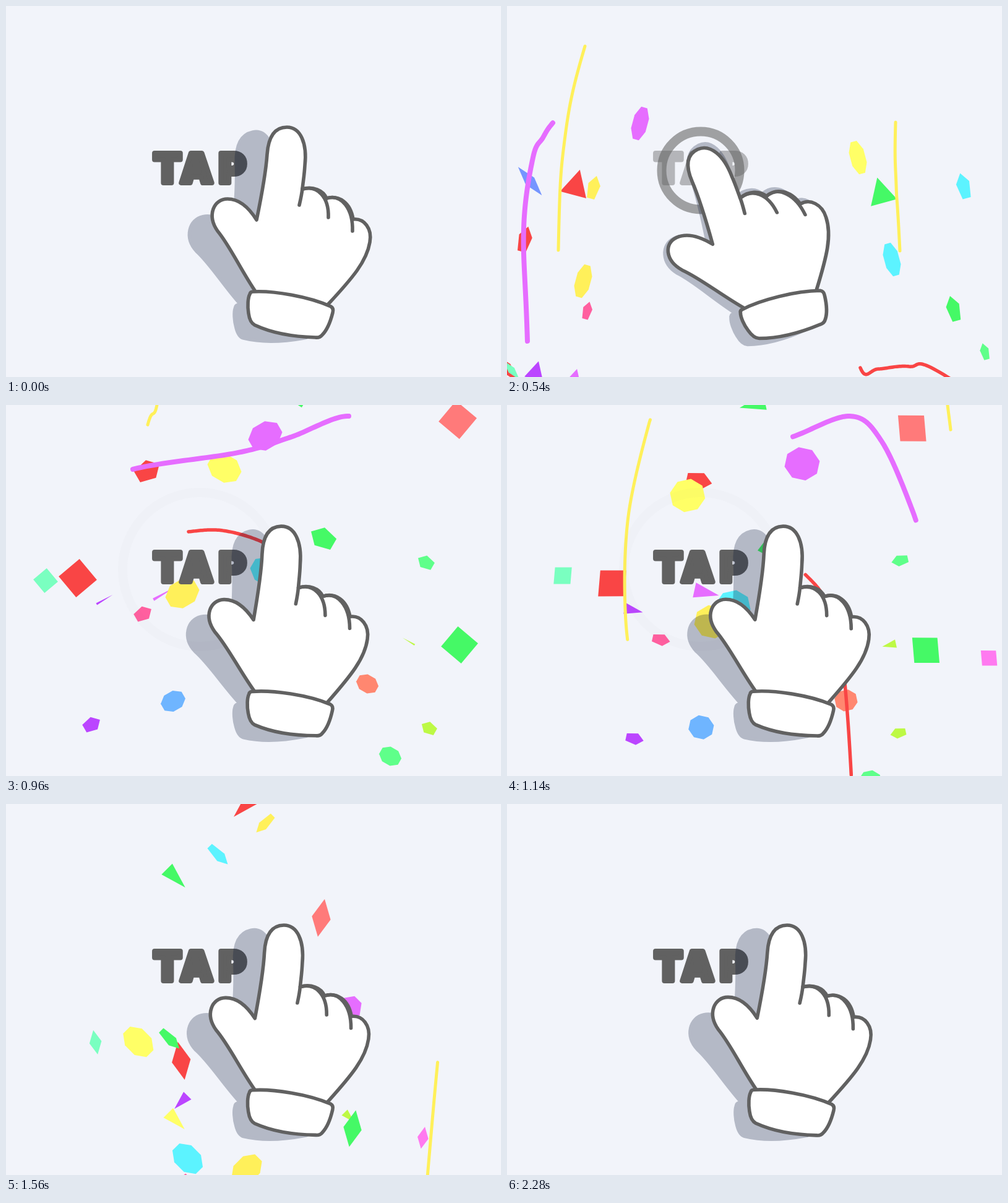
An HTML page with a canvas for the animation above (2310 ms loop, 800x600 px).

```html
<!DOCTYPE html>
<html lang="en">
<head>
<meta charset="utf-8">
<title>Tap</title>
<style>
  html, body { margin: 0; width: 100%; height: 100%; overflow: hidden; background: #f2f4fa; }
  canvas { display: block; }
</style>
</head>
<body>
<canvas id="stage" width="800" height="600"></canvas>
<script>
const LOOP = 2310, STEP = 30;
const INK = '#616161';
const ctx = document.getElementById('stage').getContext('2d');
const layer = document.createElement('canvas');
layer.width = 800;
layer.height = 600;
const layerCtx = layer.getContext('2d');

const rad = deg => deg * Math.PI / 180;
const mix = (a, b, k) => a + (b - a) * k;

// Monotone cubic interpolation through (times, values), held at both ends.
function track(t, times, values) {
  const last = times.length - 1;
  if (t <= times[0]) return values[0];
  if (t >= times[last]) return values[last];
  let i = 0;
  while (t >= times[i + 1]) i++;
  const slope = j => (values[j + 1] - values[j]) / (times[j + 1] - times[j]);
  const tangent = j => {
    if (j === 0) return slope(0);
    if (j === last) return slope(last - 1);
    const a = slope(j - 1), b = slope(j);
    return a * b <= 0 ? 0 : 2 * a * b / (a + b);
  };
  const h = times[i + 1] - times[i], u = (t - times[i]) / h, v = 1 - u;
  return v * v * (1 + 2 * u) * values[i] + u * v * v * h * tangent(i)
    + u * u * (3 - 2 * u) * values[i + 1] - u * u * v * h * tangent(i + 1);
}

// Draws a group as one shape, then blends it with a single opacity.
function faded(alpha, draw) {
  layerCtx.setTransform(1, 0, 0, 1, 0, 0);
  layerCtx.clearRect(0, 0, 800, 600);
  draw(layerCtx);
  ctx.globalAlpha = alpha;
  ctx.drawImage(layer, 0, 0);
  ctx.globalAlpha = 1;
}

// ---- Hand ----
const PIVOT = { x: 455, y: 514 };
const palm = new Path2D(`M404 463 C380 428 362 388 342 364 C324 338 336 312 358 312
  C380 312 395 330 405 346 C413 307 420 270 422 240 C424 212 434 196 454 196
  C476 196 487 222 483 258 C482 275 480 285 479 296 C496 291 513 298 518 311
  C538 305 557 318 561 345 C579 343 592 360 588 382 C583 413 560 440 520 483`);
const fingers = new Path2D(`M479 295 Q478 305 474 322
  M480 296 C503 290 522 308 521 342 M518 311 C542 303 561 328 560 364`);
const cuff = new Path2D(`M399 462 C432 460 490 470 525 486 Q530 489 528 496
  C524 512 518 525 511 532 Q507 537 500 536 C465 535 430 529 402 516
  Q394 512 392 497 C390 485 391 472 394 466 Q395 462 399 462 Z`);

function pose(c, xAngle, yAngle, dx = 0, dy = 0, stretch = 1) {
  const ax = rad(xAngle), ay = rad(yAngle);
  c.setTransform(Math.cos(ax), Math.sin(ax), -Math.sin(ay) * stretch, Math.cos(ay) * stretch,
    PIVOT.x + dx, PIVOT.y + dy);
  c.translate(-PIVOT.x, -PIVOT.y);
}

function drawHand(c, fill, line) {
  c.fillStyle = fill;
  c.strokeStyle = line;
  c.lineWidth = 5.6;
  c.lineCap = c.lineJoin = 'round';
  c.fill(palm);
  c.stroke(palm);
  c.stroke(fingers);
  c.fill(cuff);
  c.stroke(cuff);
}

function handWithShadow(t) {
  const press = track(t, [30, 400, 560, 780, 960, 1320, 1800, 2280, 2310],
    [0, 1, 1, .636, .062, .046, .023, .009, .007]);
  const ax = -24.3 * press, ay = -27.3 * press;
  faded(.255, c => {
    pose(c, ax - 12 + 10 * press, ay - 6.4 + 10.9 * press, -19.5, 10 - 2 * press, 1.013);
    drawHand(c, '#031032', '#031032');
  });
  pose(ctx, ax, ay);
  drawHand(ctx, '#fff', INK);
  ctx.setTransform(1, 0, 0, 1, 0, 0);
}

// ---- Label and ripple ----
function label(t) {
  faded(track(t, [250, 440, 540, 780, 960, 1200], [1, .4, .42, .85, .98, 1]), c => {
    c.font = '900 66px Inter, Roboto, sans-serif';
    c.textAlign = 'center';
    c.lineWidth = 8;
    c.lineJoin = 'round';
    c.fillStyle = c.strokeStyle = INK;
    [['T', 261], ['A', 308], ['P', 366]].forEach(([letter, x]) => {
      c.fillText(letter, x, 286);
      c.strokeText(letter, x, 286);
    });
  });
}

function ripple(t) {
  if (t < 400) return;
  ctx.globalAlpha = track(t, [400, 540, 780, 960, 1320, 1500], [.62, .57, .33, .02, .02, 0]);
  ctx.strokeStyle = INK;
  ctx.lineWidth = 15;
  ctx.beginPath();
  ctx.arc(313, 266, track(t, [400, 540, 780, 960], [0, 63, 112.5, 124.5]), 0, 7);
  ctx.stroke();
  ctx.globalAlpha = 1;
}

// ---- Confetti: colour, radius, point near the top of the arc, point on the way down ----
const CONFETTI = {
  8: [['#e66dff', 29, 419, 50, 521, 185], ['#ffff66', 29, 353, 102, 245, 235],
      ['#fff05a', 29, 285, 305, 366, 441], ['#5cf3ff', 29, 422, 270, 322, 431],
      ['#ff8770', 19, 584, 451, 516, 536], ['#6fb5ff', 21, 270, 479, 348, 606],
      ['#5fff8a', 19, 621, 568, 560, 690]],
  4: [['#f94545', 31, 116, 280, 228, 310], ['#45f966', 30, 733, 388, 617, 419],
      ['#ff7a7a', 31, 730, 24, 579, 71], ['#7affc0', 20, 64, 284, 118, 273],
      ['#ff7af0', 18, 830, 400, 725, 433], ['#7595ff', 30, 97, -218, 154, -190]],
  5: [['#f94545', 23, 228, 107, 389, 158], ['#45f966', 23, 513, 216, 342, 265],
      ['#fff05a', 21, 255, -100, 365, -75], ['#ff5f9f', 16, 221, 338, 269, 463],
      ['#bdf945', 14, 684, 523, 579, 550], ['#bb45ff', 16, 138, 517, 267, 590],
      ['#5fff8a', 15, 679, 255, 590, 250], ['#5cf3ff', 23, 571, -60, 417, -26]],
  3: [['#45f966', 28, 467, -5, 335, 8], ['#e66dff', 27, 250, 308, 387, 300],
      ['#bb45ff', 20, 155, 317, 245, 365], ['#ffff66', 25, 510, 380, 350, 402],
      ['#bdf945', 15, 654, 384, 586, 397], ['#f94545', 28, 225, -131, 334, -105]]
};
const FLIGHT = [300, 540, 780, 960, 1320, 1800, 2190];
const FLIP = {
  8: [-1, -.45, .12, .78, 1, .2, -.8],
  4: [-1, -.3, .5, 1, .75, .15, -.8],
  5: [-1, -.5, .08, .75, .45, .3, -.6],
  3: [.2, .9, .6, .1, .95, -.2, -1]
};

function confetti(t) {
  if (t <= FLIGHT[0] || t >= FLIGHT[6]) return;
  const turn = track(t, FLIGHT, [0, 15, 25, 60, 150, 300, 400]);
  for (const [sides, pieces] of Object.entries(CONFETTI)) {
    const n = +sides, flip = track(t, FLIGHT, FLIP[n]);
    for (const [color, r, x0, y0, x1, y1] of pieces) {
      // Steeper falls peaked early; shallow ones are still near their peak.
      const drop = y1 - y0;
      const late = Math.min(1, Math.max(0, (135 - drop) / 105));
      const boost = Math.max(0, -y0) * .9;
      const along = track(t, FLIGHT, [mix(-3, -1.7, late), mix(-2, -1.05, late),
        mix(-.58, -.25, late), 0, 1, mix(1.48, 1.9, late), mix(1.7, 2.4, late)]);
      const fall = track(t, FLIGHT, [mix(680, 850, late) + boost, mix(140, 305, late) + boost,
        mix(3, 48, late), 0, drop, mix(485, 325, late), mix(950, 860, late)]);
      ctx.save();
      ctx.translate(x0 + (x1 - x0) * along, y0 + fall);
      ctx.rotate(rad(turn + (n === 4 ? 125 : 0)) * Math.sign(x1 - x0));
      ctx.scale(flip, 1);
      ctx.beginPath();
      for (let i = 0; i < n; i++) {
        const a = 2 * Math.PI * i / n + (n === 8 ? Math.PI / 8 : -Math.PI / 2);
        ctx.lineTo(r * Math.cos(a), r * Math.sin(a));
      }
      ctx.closePath();
      ctx.fillStyle = color;
      ctx.fill();
      ctx.restore();
    }
  }
}

// ---- Streamers: head and tail run along a smooth curve through the points ----
const parsePoints = text => text.split(' ').map(p => p.split(',').map(Number));
const RUN = [300, 540, 780, 960, 1320, 1650];
const STREAMERS = [
  { color: '#e66dff', width: 8, head: [0, 5, 8, 10, 14, 16], tail: [0, 1, 4, 7, 11, 16],
    points: parsePoints('45,960 33,542 27,360 42,245 58,213 74,189 115,145 205,104 375,77 460,52 554,18 605,58 655,170 690,280 749,390 850,640 900,900') },
  { color: '#fff05a', width: 5, head: [0, 3, 4.5, 7, 11.3, 13], tail: [0, 1, 3.6, 5, 9, 13],
    points: parsePoints('80,900 83,395 94,210 126,65 200,-150 262,-120 244,0 229,32 196,180 191,330 206,450 240,600 290,800 340,1000') },
  { color: '#fff05a', width: 5, head: [0, 3, 4.4, 5, 8, 10], tail: [0, 1, 4, 4.5, 5.7, 10],
    points: parsePoints('660,900 635,396 629,290 628,188 640,-100 690,-150 712,0 720,100 711,270 690,500 660,850') },
  { color: '#f94545', width: 5.5, head: [0, 1, 4, 8, 10, 10], tail: [0, 0, 2, 5, 10, 10],
    points: parsePoints('140,900 150,625 172,345 215,250 271,211 295,205 350,203 415,222 470,260 540,400 570,900') },
  { color: '#f94545', width: 5.5, head: [0, 4, 8.5, 9, 9, 9], tail: [0, .8, 7, 9, 9, 9],
    points: parsePoints('1000,800 712,600 650,583 600,587 571,585 545,450 553,200 551,84 547,0 530,-200') }
];

function curveAt(points, u) {
  const i = Math.min(Math.floor(u), points.length - 2), k = u - i;
  const at = j => points[Math.min(Math.max(j, 0), points.length - 1)];
  const [a, b, c, d] = [at(i - 1), at(i), at(i + 1), at(i + 2)];
  return [0, 1].map(m => b[m] + .5 * k * (c[m] - a[m]
    + k * (2 * a[m] - 5 * b[m] + 4 * c[m] - d[m]
    + k * (3 * (b[m] - c[m]) + d[m] - a[m]))));
}

function streamers(t) {
  ctx.lineCap = ctx.lineJoin = 'round';
  for (const { color, width, head, tail, points } of STREAMERS) {
    const from = track(t, RUN, tail), to = track(t, RUN, head);
    if (to - from < .01) continue;
    ctx.strokeStyle = color;
    ctx.lineWidth = width;
    ctx.beginPath();
    for (let i = 0; i <= 80; i++) ctx.lineTo(...curveAt(points, mix(from, to, i / 80)));
    ctx.stroke();
  }
}

function render(t) {
  ctx.fillStyle = '#f2f4fa';
  ctx.fillRect(0, 0, 800, 600);
  confetti(t);
  streamers(t);
  label(t);
  ripple(t);
  handWithShadow(t);
}

let start;
function tick(now) {
  start ??= now;
  render(Math.floor(((now - start) % LOOP) / STEP) * STEP);
  requestAnimationFrame(tick);
}
render(0);
requestAnimationFrame(tick);
</script>
</body>
</html>
```
